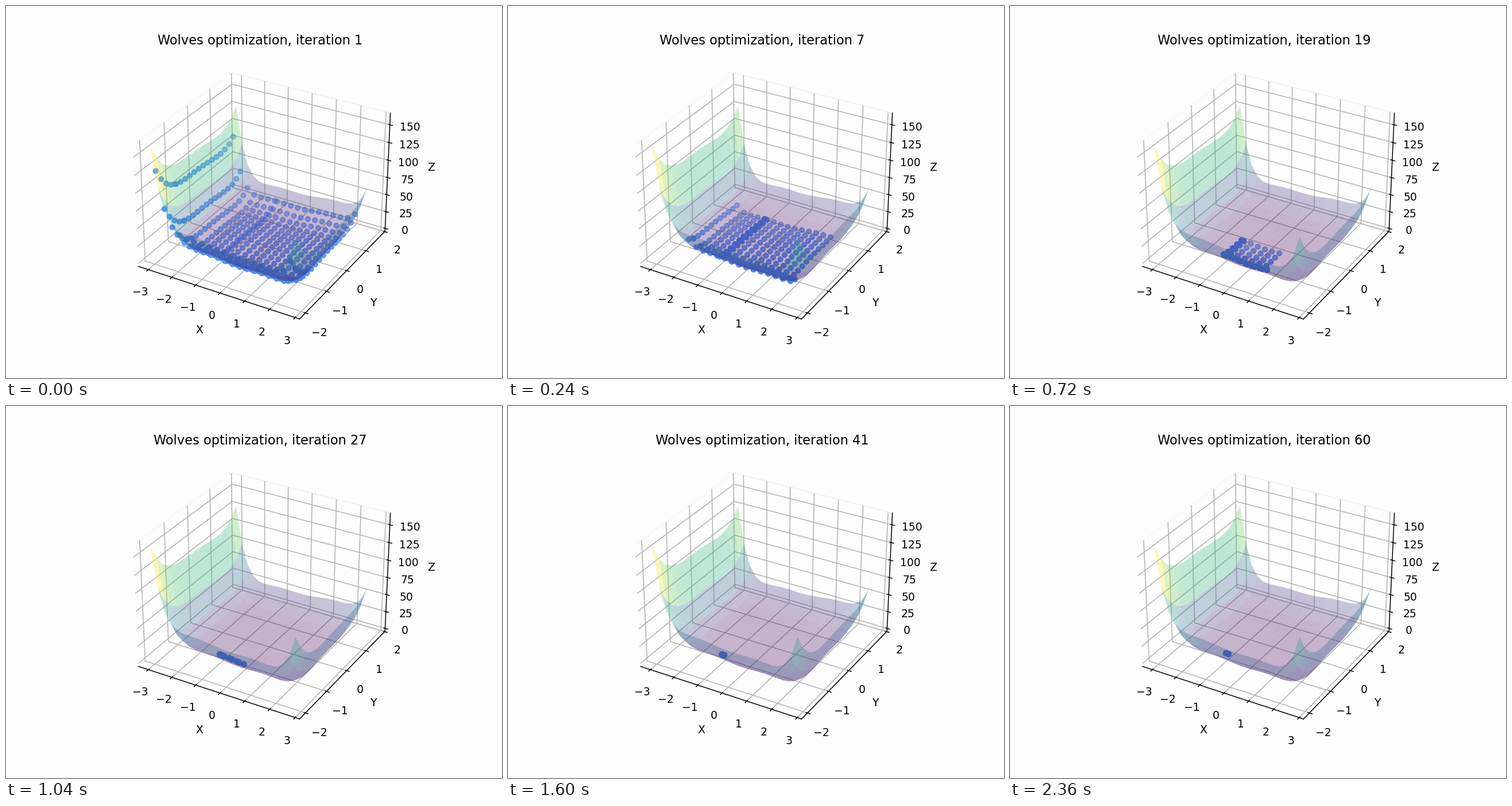
Write a matplotlib script that moves like this. It is 864 px wide and 648 px high and loops after 2.4 s.

```python
import numpy as np
import matplotlib.pyplot as plt
from matplotlib.animation import FuncAnimation

FRAMES, INTERVAL = 60, 40
PAPER = "#fdfdfd"
BLUE = (68 / 255, 135 / 255, 240 / 255)
LEADER = -10.5  # both coordinates, in tenths of a unit


def camel(x, y):
    """Six-hump camel function."""
    return (4 - 2.1 * x**2 + x**4 / 3) * x**2 + x * y + 4 * (y**2 - 1) * y**2


def start_pack():
    """Regular pack of wolves, in tenths of a unit."""
    x, y = np.meshgrid(-30 + 3 * np.arange(19), -20 + 2 * np.arange(19))
    x, y = x.ravel(), y.ravel()
    return x + 2 * ((x > LEADER) & (y < LEADER)), y


def hunt(p, steps):
    """Every wolf steps one tenth towards the leader and swings around it."""
    for _ in range(steps):
        p = p + np.where(p < LEADER, 1, -1)
    return p


def limits(values, margin):
    lo, hi = values.min(), values.max()
    pad = margin * (hi - lo)
    lo, hi = lo - pad, hi + pad
    rim = (hi - lo) / 48
    return lo - rim, hi + rim


def shades(x, y, z):
    """Wolves nearer to the viewer are more opaque."""
    elev, azim = np.radians(30), np.radians(-60)
    depth = (np.cos(elev) * (np.cos(azim) * x / np.ptp(xlim)
                             + np.sin(azim) * y / np.ptp(ylim))
             + np.sin(elev) * 0.75 * z / np.ptp(zlim))
    near = (depth - depth.min()) / max(np.ptp(depth), 1e-9)
    rgba = np.empty((len(x), 4))
    rgba[:, :3] = BLUE
    rgba[:, 3] = 0.45 + 0.55 * near
    return rgba


X, Y = np.meshgrid(np.arange(-3, 3, 0.25), np.arange(-2, 2, 0.25))
Z = camel(X, Y)
xlim, ylim, zlim = limits(X, 0.05), limits(Y, 0.05), limits(Z, 0)

fig = plt.figure(figsize=(6.4, 4.8), dpi=135, facecolor=PAPER)
ax = fig.add_subplot(projection="3d", computed_zorder=False, facecolor=PAPER)
ax.plot_surface(X, Y, Z, cmap="viridis", alpha=0.3, linewidth=0.25, zorder=3)
ax.set(xlim=xlim, ylim=ylim, zlim=zlim, xlabel="X", ylabel="Y", zlabel="Z")
ax.set_xticks(range(-3, 4))
ax.set_yticks(range(-2, 3))
ax.set_zticks(range(0, 151, 25))
for axis in (ax.xaxis, ax.yaxis, ax.zaxis):
    axis.pane.fill = False

title = ax.set_title("")
x0, y0 = start_pack()
dots = []


def update(frame):
    while dots:
        dots.pop().remove()
    x, y = hunt(x0, frame + 1) / 10, hunt(y0, frame + 1) / 10
    z = camel(x, y)
    dots.append(ax.scatter(x, y, z, s=20, c=shades(x, y, z),
                           depthshade=False, zorder=2))
    title.set_text(f"Wolves optimization, iteration {frame + 1}")
    return dots


anim = FuncAnimation(fig, update, frames=FRAMES, interval=INTERVAL,
                     init_func=lambda: dots, repeat=True, repeat_delay=0)
plt.show()
```
